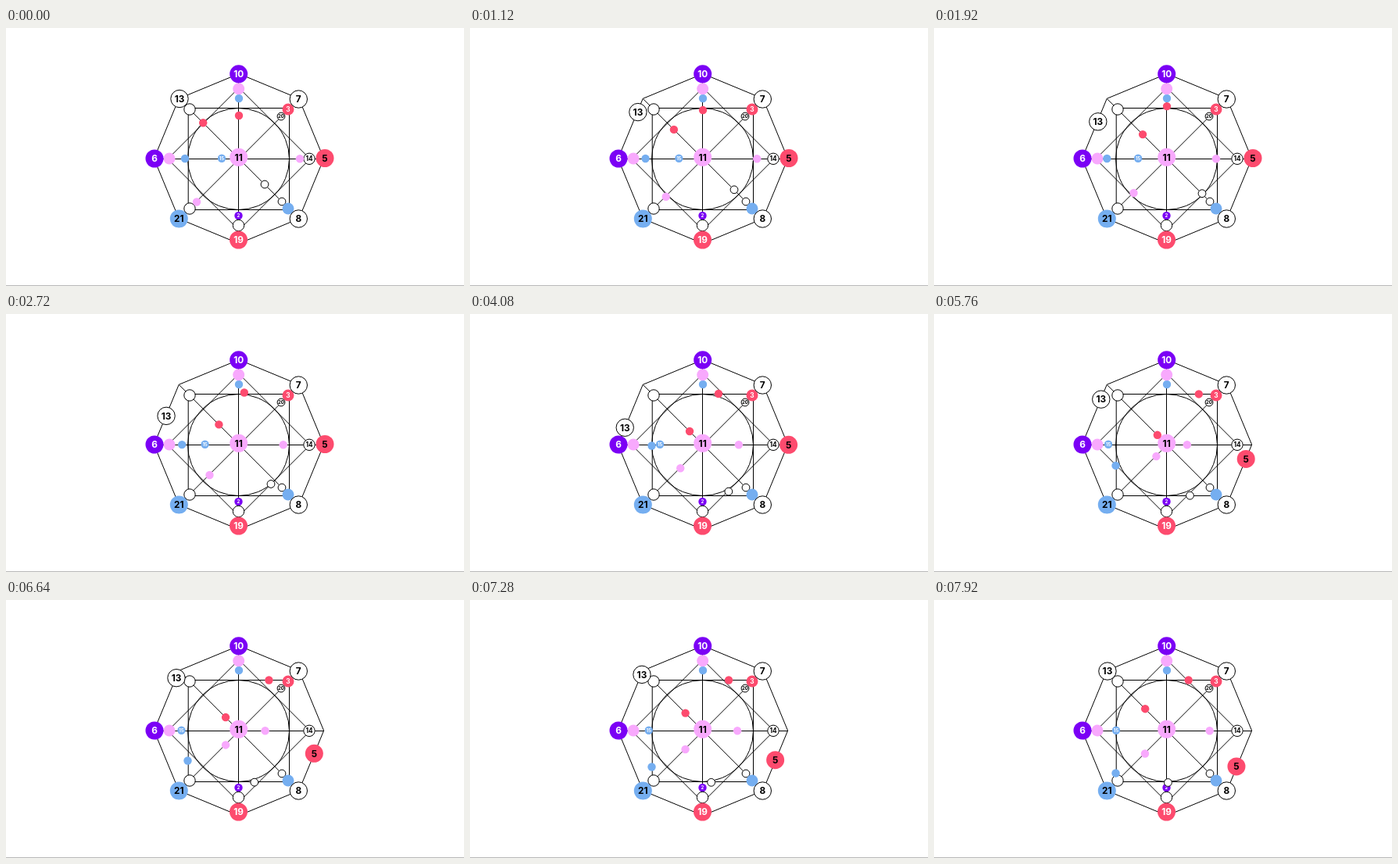
These frames come from a looping animation (586x330 px, 8 s). An HTML page:

```html
<!DOCTYPE html>
<html lang="en">
<head>
<meta charset="utf-8">
<title>Orbit of numbers</title>
<style>
  html, body { margin: 0; width: 100%; height: 100%; overflow: hidden; background: #fff; }
  svg { display: block; }
  text { font-family: Inter, "Open Sans", sans-serif; font-weight: 700; text-anchor: middle; }
</style>
</head>
<body>
<svg id="stage" width="586" height="330" viewBox="0 0 586 330"></svg>
<script>
const PURPLE = '#7b00f5', PINK = '#f8a9fd', RED = '#fd4b6e', BLUE = '#75aef0', WHITE = '#fff', BLACK = '#000';
const LOOP = 8000, LEG = 2000, TICK = 80;
const stage = document.getElementById('stage');

function add(parent, tag, attrs) {
  const el = document.createElementNS('http://www.w3.org/2000/svg', tag);
  for (const key in attrs) el.setAttribute(key, attrs[key]);
  return parent.appendChild(el);
}

const grid = add(stage, 'g', { fill: 'none', stroke: BLACK, 'stroke-width': 1 });

function polygon(sides, cx, cy, radius) {
  const points = [];
  for (let i = 0; i < sides; i++) {
    const a = i * 2 * Math.PI / sides;
    points.push([cx + radius * Math.cos(a), cy + radius * Math.sin(a)]);
  }
  add(grid, 'polygon', { points: points.join(' ') });
}

function spoke(cx, cy, dx, dy) {
  add(grid, 'line', { x1: cx - dx, y1: cy - dy, x2: cx + dx, y2: cy + dy });
}

polygon(8, 298, 167.1, 108.6);
polygon(4, 298, 167.5, 91);
add(grid, 'rect', { x: 233.2, y: 102.5, width: 129.3, height: 130 });
add(grid, 'circle', { cx: 297.5, cy: 167.5, r: 65 });
spoke(297.5, 167.5, 109, 0);
spoke(297.5, 167.5, 0, 109);
spoke(298.2, 167.4, 76.7, 76.7);
spoke(298.2, 167.4, 76.7, -76.7);
add(stage, 'rect', { x: 0, y: 329, width: 586, height: 1, fill: '#b8b8b8' });

function node(x, y, r, fill, label = '', ink = BLACK) {
  const g = add(stage, 'g', { transform: `translate(${x} ${y})` });
  const outlined = fill === WHITE;
  add(g, 'circle', { r: outlined ? r - 0.3 : r, fill, stroke: outlined ? BLACK : 'none' });
  if (label) {
    const size = r > 10 ? 11.8 : r > 6 ? 8.3 : 6;
    add(g, 'text', { y: size * 0.363, 'font-size': size, fill: ink }).textContent = label;
  }
  return g;
}

const BIG = 11.5, MID = 7.5, SMALL = 5.2;

node(298, 90, SMALL, BLUE);
node(352, 113, SMALL, WHITE, '20');
node(353, 222, SMALL, WHITE);
node(297.5, 240, SMALL, PURPLE, '2', WHITE);

node(297.7, 77.7, MID, PINK);
node(361, 104, MID, RED, '3', WHITE);
node(388, 167.3, MID, WHITE, '14');
node(361, 231, MID, BLUE);
node(297.5, 252.5, MID, WHITE);
node(235, 231, MID, WHITE);
node(209, 167, MID, PINK);
node(235, 104, MID, WHITE);

node(297.7, 58.8, BIG, PURPLE, '10', WHITE);
node(374.3, 91, BIG, WHITE, '7');
node(374.3, 244, BIG, WHITE, '8');
node(297.5, 271, BIG, RED, '19', WHITE);
node(221.3, 244, BIG, BLUE, '21');
node(190, 167, BIG, PURPLE, '6', WHITE);
node(297.7, 165.3, BIG, PINK, '11');

// Each mover passes its points at even two-second steps, in straight lines.
const movers = [];
function mover(points, ...look) {
  movers.push({ points, el: node(...points[0], ...look) });
}
const along = (xs, yOf) => xs.map(x => [x, yOf(x)]);

mover(along([376, 360.3, 344.8, 321, 354], () => 167.2), SMALL, PINK);
mover(along([252.2, 267.7, 280.8, 286.5, 269.5], x => x - 131), SMALL, RED);
mover(along([244, 256, 268.5, 286.6, 269.3], x => 466.5 - x), SMALL, PINK);
mover([[298, 112], [298, 99.6], [317, 102], [341.8, 102.5], [325, 102.5]], SMALL, RED);
mover([[229, 167], [221, 167], [232.5, 167.3], [232.5, 197.5], [232.5, 222.5]], SMALL, BLUE);
mover(along([276, 260.5, 244, 220.2, 233.5], () => 166.8), SMALL, BLUE, '15', WHITE);
mover([[331, 200], [343.5, 212.2], [331, 226.8], [327, 233], [298.3, 233.5]], SMALL, WHITE);
mover([[222, 90.5], [209.3, 121], [197.5, 147], [216, 104], [222.2, 90.5]], BIG, WHITE, '13');
mover([[408, 166.5], [408, 166.5], [408, 166.5], [398, 188], [386.5, 214]], BIG, RED, '5');

function draw(now) {
  const t = Math.floor(now % LOOP / TICK) * TICK;
  const leg = Math.floor(t / LEG), part = t / LEG - leg;
  for (const { points, el } of movers) {
    const [x0, y0] = points[leg], [x1, y1] = points[leg + 1];
    el.setAttribute('transform', `translate(${x0 + (x1 - x0) * part} ${y0 + (y1 - y0) * part})`);
  }
}

let start;
function frame(now) {
  start ??= now;
  draw(now - start);
  requestAnimationFrame(frame);
}
draw(0);
requestAnimationFrame(frame);
</script>
</body>
</html>
```
